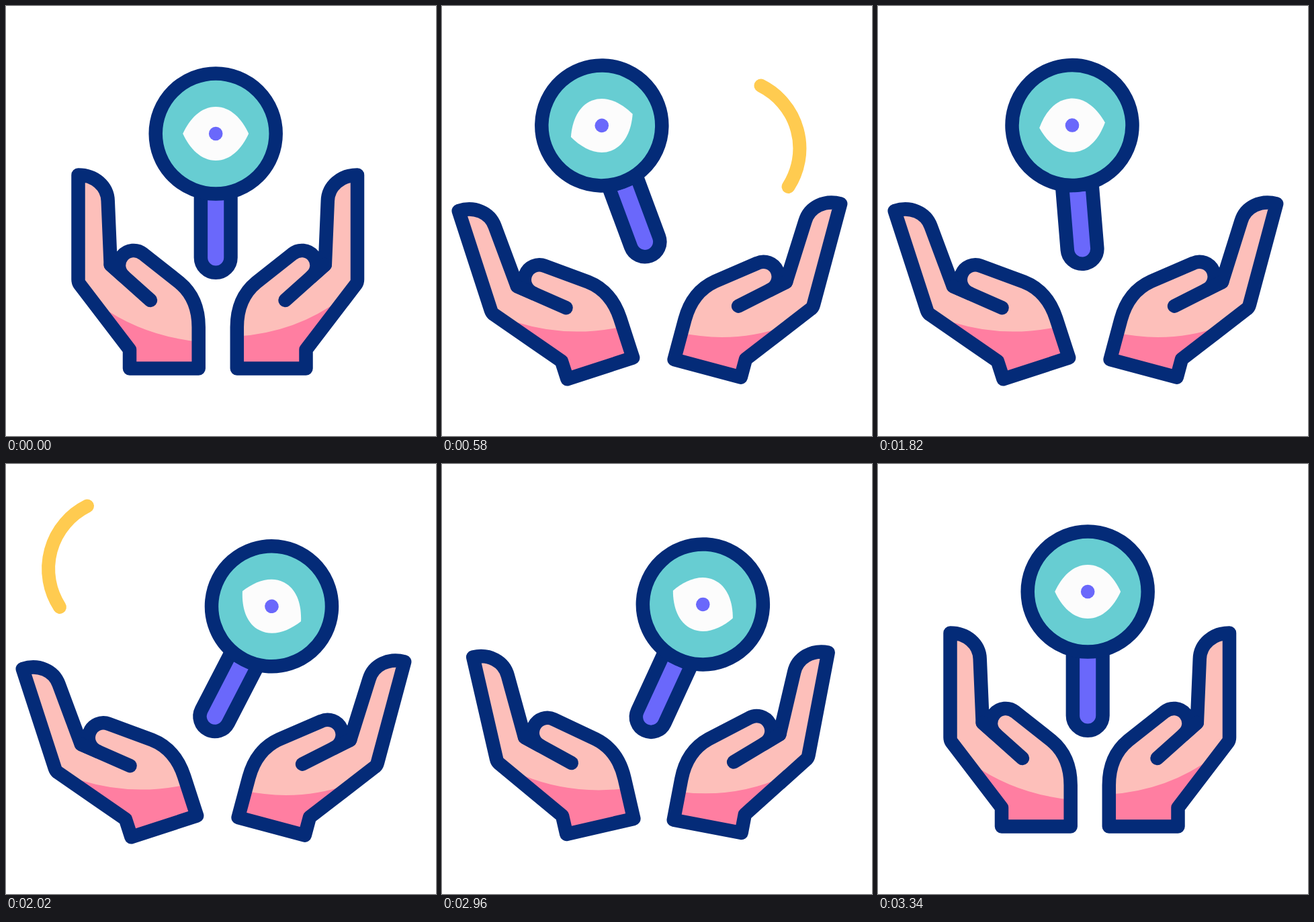
An HTML page that plays this animation: 640x640 px, repeating every 3600 ms.

```html
<!DOCTYPE html>
<html lang="en">
<head>
<meta charset="utf-8">
<title>Hands and magnifier</title>
<style>
  html, body { margin: 0; width: 100%; height: 100%; overflow: hidden; background: #fff; }
  svg { display: block; width: 100%; height: 100%; }
  .ink { stroke: #042b78; stroke-width: 20.5; stroke-linecap: round; stroke-linejoin: round; }
  .glow { fill: none; stroke: #ffcb50; stroke-width: 20; stroke-linecap: round; }
</style>
</head>
<body>
<svg viewBox="0 0 640 640">
  <defs>
    <path id="shape" d="M107.5 251.5 C132 251.5 151 268 151.7 290 L155.7 385 L176 403
      A21.5 21.5 0 0 1 204.2 369 L258 411.5 C278 428 286.7 450 286.7 478
      V539.5 H184 V511.5 L109.5 414 Q107.5 411 107.5 407 Z"/>
    <path id="crease" d="M155.7 385 L215 438"/>
    <clipPath id="inside"><use href="#shape"/></clipPath>
  </defs>

  <g id="leftHand">
    <use href="#shape" fill="#fdbfba"/>
    <g clip-path="url(#inside)">
      <path id="leftCuff" fill="#ff7ea1" d="M140 446 Q205 492 290 500 V570 H140 Z"/>
    </g>
    <use href="#shape" class="ink" fill="none"/>
    <use href="#crease" class="ink"/>
  </g>
  <g id="rightHand">
    <g transform="matrix(-1 0 0 1 630.5 0)">
      <use href="#shape" fill="#fdbfba"/>
      <g clip-path="url(#inside)">
        <path id="rightCuff" fill="#ff7ea1" d="M132 436 Q200 487 290 492 V570 H132 Z"/>
      </g>
      <use href="#shape" class="ink" fill="none"/>
      <use href="#crease" class="ink"/>
    </g>
  </g>

  <g id="magnifier">
    <path class="ink" fill="#6a68fb" d="M-22.3 -49 V46.5 A22.3 22.3 0 0 0 22.3 46.5 V-49 Z"/>
    <g transform="translate(0 -138)">
      <circle class="ink" r="89.5" fill="#67cdd2"/>
      <path id="eye" fill="#fcfcfc" d="M-49 0 C-39 -22 -22 -40 0 -40 S39 -22 49 0 C39 22 22 40 0 40 S-39 22 -49 0 Z"/>
      <circle r="10.3" fill="#6a68fb"/>
    </g>
  </g>

  <path id="rightArc" class="glow"/>
  <path id="leftArc" class="glow"/>
  <path id="leftSparks" class="glow"/>
  <path id="rightSparks" class="glow"/>
</svg>
<script>
const LOOP = 3600;
const el = id => document.getElementById(id);
const set = (id, name, value) => el(id).setAttribute(name, value);
const mix = (a, b, p) => a + (b - a) * p;
const ramp = (t, from, to) => Math.min(1, Math.max(0, (t - from) / (to - from)));
const ease = (t, from, to) => { const p = ramp(t, from, to); return p * p * (3 - 2 * p); };
const quad = (t, from, to) => {
  const p = ramp(t, from, to);
  return p < .5 ? 2 * p * p : 1 - 2 * (1 - p) ** 2;
};
const polar = (cx, cy, r, deg, side) => {
  const a = deg * Math.PI / 180;
  return `${(cx + side * r * Math.cos(a)).toFixed(2)} ${(cy + r * Math.sin(a)).toFixed(2)}`;
};

// Magnifier moves: start, end, then the pose reached (pivot x, y, angle).
const rest = [312.2, 328, 0];
const moves = [
  [210, 710, [280.6, 303.2, -24.4]],
  [1650, 2065, [333.8, 335.4, 29]],
  [2840, 3340, rest]
];
// Spark rays: angle, inner and outer radius.
const rays = [[-75, 59, 115], [-34, 59, 116], [9, 54, 121]];

function magnifierPose(t) {
  return moves.reduce((pose, [from, to, goal]) =>
    pose.map((v, i) => mix(v, goal[i], ease(t, from, to))), rest);
}

function arcPath(t, cx, cy, side) {
  const head = quad(t, 380, 720), tail = quad(t, 600, 1000);
  if (head - tail < .001) return "";
  const at = p => polar(cx, cy, 104.4, mix(33, -112, p), side);
  return `M${at(tail)} A104.4 104.4 0 0 ${side > 0 ? 0 : 1} ${at(head)}`;
}

function sparkPath(t, cx, cy, side) {
  const p = ramp(t, 660, 1080), head = ramp(p, 0, .7), tail = ramp(p, .45, 1);
  if (head - tail < .001) return "";
  return rays.map(([deg, r0, r1]) => {
    const at = q => polar(cx, cy, mix(r0, r1, q), deg, side);
    return `M${at(tail)} L${at(head)}`;
  }).join(" ");
}

const blink = t => 1 - .7 * (ease(t, 855, 965) - ease(t, 965, 1080));

function draw(t) {
  const second = t - 1440; // the right-hand swing repeats the effects of the left one
  const open = ease(t, 130, 565) - ease(t, 2790, 3280);
  set("leftHand", "transform", `rotate(${-18 * open} 235 539.5)`);
  set("rightHand", "transform", `rotate(${15 * open} 395.6 539.5)`);
  set("leftCuff", "transform", `translate(0 ${-9 * open})`);
  set("rightCuff", "transform", `translate(0 ${7 * open})`);

  const [x, y, angle] = magnifierPose(t);
  set("magnifier", "transform", `translate(${x} ${y}) rotate(${angle})`);
  set("eye", "transform", `scale(1 ${blink(t) * blink(second)})`);

  set("rightArc", "d", arcPath(t, 428, 212, 1));
  set("leftArc", "d", arcPath(second, 167.5, 156, -1));
  set("leftSparks", "d", sparkPath(t, 199.5, 143, -1));
  set("rightSparks", "d", sparkPath(second, 424.5, 181, 1));
}

const start = performance.now();
function tick() {
  draw((performance.now() - start) % LOOP);
  requestAnimationFrame(tick);
}
tick();
</script>
</body>
</html>
```
